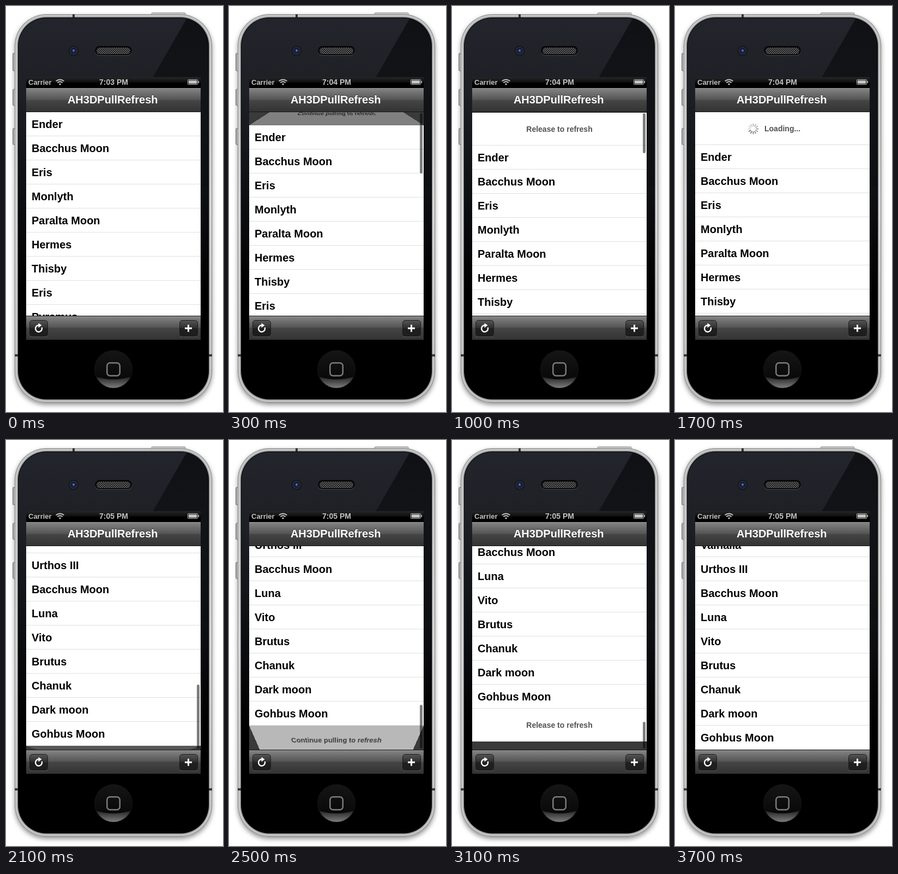
These frames come from a looping animation (398x742 px, 3.8 s). An HTML page:

```html
<!DOCTYPE html>
<html lang="en">
<head>
<meta charset="utf-8">
<title>Pull to refresh</title>
<style>
  html, body { margin: 0; width: 100%; height: 100%; overflow: hidden; background: #fff; }
  body, text { font-family: "Liberation Sans", Arial, sans-serif; font-weight: bold; }
  #phone { position: absolute; left: 0; top: 0; display: block; }
  #table { position: absolute; left: 37px; top: 194px; width: 320px; height: 372px; overflow: hidden; background: #3a3a3a; }
  #rows { position: absolute; left: 0; top: 0; width: 100%; }
  .row { box-sizing: border-box; height: 44px; padding-left: 10px; background: #fff; border-bottom: 1px solid #e0e0e0; font-size: 20px; line-height: 44px; white-space: nowrap; }
  #fold { position: absolute; left: 0; width: 320px; height: 60px; background: #fff; font-size: 14px; line-height: 61px; color: #525252; text-align: center; white-space: nowrap; }
  #fold.head { box-shadow: inset 0 -1px #e0e0e0; }
  #fold.busy #label { position: absolute; left: 127px; }
  #shade { position: absolute; inset: 0; background: #000; }
  #spin { position: absolute; left: 96px; top: 20px; display: none; }
  #fold.busy #spin { display: block; }
  #bar { position: absolute; left: 313px; width: 5px; border-radius: 3px; background: rgba(0, 0, 0, .5); }
</style>
</head>
<body>
<svg id="phone" width="398" height="742" viewBox="0 0 398 742">
  <defs>
    <linearGradient id="glass" x1="0" y1="0" x2="0" y2="1">
      <stop offset="0" stop-color="#23252c"/><stop offset=".2" stop-color="#1d1f25"/>
      <stop offset=".5" stop-color="#0c0d10"/><stop offset=".72" stop-color="#000"/>
    </linearGradient>
    <linearGradient id="gloss" x1="0" y1="0" x2="0" y2="1">
      <stop offset="0" stop-color="#08090c" stop-opacity=".72"/><stop offset="1" stop-color="#08090c" stop-opacity=".3"/>
    </linearGradient>
    <linearGradient id="steel" x1="0" y1="0" x2="0" y2="1">
      <stop offset="0" stop-color="#c4c5c6"/><stop offset=".5" stop-color="#dcdcdc"/><stop offset="1" stop-color="#c2c2c2"/>
    </linearGradient>
    <linearGradient id="key" x1="0" y1="0" x2="1" y2="0">
      <stop offset="0" stop-color="#888"/><stop offset=".5" stop-color="#eee"/><stop offset="1" stop-color="#aaa"/>
    </linearGradient>
    <linearGradient id="status" x1="0" y1="0" x2="0" y2="1">
      <stop offset="0" stop-color="#262626"/><stop offset=".5" stop-color="#0c0c0c"/><stop offset=".5" stop-color="#000"/>
    </linearGradient>
    <linearGradient id="chrome" x1="0" y1="0" x2="0" y2="1">
      <stop offset="0" stop-color="#858585"/><stop offset=".5" stop-color="#525252"/>
      <stop offset=".5" stop-color="#454545"/><stop offset="1" stop-color="#333"/>
    </linearGradient>
    <linearGradient id="button" x1="0" y1="0" x2="0" y2="1">
      <stop offset="0" stop-color="#555"/><stop offset=".5" stop-color="#2c2c2c"/>
      <stop offset=".5" stop-color="#202020"/><stop offset="1" stop-color="#1d1d1d"/>
    </linearGradient>
    <linearGradient id="home" x1="0" y1="0" x2="0" y2="1">
      <stop offset="0" stop-color="#151515"/><stop offset="1" stop-color="#050505"/>
    </linearGradient>
    <linearGradient id="shine" x1="0" y1="0" x2="0" y2="1">
      <stop offset="0" stop-color="#1c1c1c"/><stop offset="1" stop-color="#858585"/>
    </linearGradient>
    <radialGradient id="lens">
      <stop offset="0" stop-color="#3c5cb0"/><stop offset=".5" stop-color="#1c2c62"/><stop offset="1" stop-color="#0a0d1a"/>
    </radialGradient>
    <pattern id="mesh" width="4" height="4" patternUnits="userSpaceOnUse">
      <rect width="4" height="4" fill="#595959"/>
      <circle cx="1" cy="1" r="1.05" fill="#161616"/><circle cx="3" cy="3" r="1.05" fill="#161616"/>
    </pattern>
    <filter id="drop" x="-10%" y="-10%" width="120%" height="120%">
      <feDropShadow dx="0" dy="4" stdDeviation="4" flood-color="#000" flood-opacity=".42"/>
    </filter>
    <clipPath id="face"><rect x="23" y="22" width="348" height="696" rx="51"/></clipPath>
    <clipPath id="dish"><circle cx="197" cy="664" r="34"/></clipPath>
  </defs>

  <g fill="url(#key)" stroke="#8b8b8b">
    <rect x="12.5" y="86.500" width="6" height="32" rx="1.500"/>
    <rect x="12.500" y="152" width="6" height="30" rx="2"/>
    <rect x="12.500" y="223.500" width="6" height="30" rx="2"/>
    <rect x="267" y="12.500" width="62" height="6" rx="1.500" fill="#d8d8d8"/>
  </g>
  <rect x="16" y="15" width="362" height="710" rx="58" fill="#858585" filter="url(#drop)"/>
  <rect x="17" y="16" width="360" height="708" rx="57" fill="url(#steel)"/>
  <rect x="20.500" y="19.500" width="353" height="701" rx="53.500" fill="#929292"/>
  <path d="M16 638.500h7M371 638.500h7M124 15v7" stroke="#333" stroke-width="4"/>
  <rect x="22" y="21" width="350" height="698" rx="52" fill="#000"/>
  <rect x="23" y="22" width="348" height="696" rx="51" fill="url(#glass)"/>
  <path d="M333 20L258 150V330H372V20z" fill="url(#gloss)" clip-path="url(#face)"/>

  <circle cx="124" cy="82" r="9.500" fill="#15171c"/>
  <circle cx="124" cy="82" r="7.500" fill="#282b32"/>
  <circle cx="124" cy="82" r="5" fill="url(#lens)"/>
  <circle cx="124" cy="81" r="1.300" fill="#6c8be0"/>
  <rect x="163" y="74" width="68" height="17" rx="8.500" fill="#4b4d52"/>
  <rect x="163" y="73" width="68" height="17" rx="8.500" fill="#08080a"/>
  <rect x="166" y="76" width="62" height="12" rx="6" fill="url(#mesh)"/>

  <circle cx="197" cy="664" r="35" fill="#151515"/>
  <circle cx="197" cy="664" r="34" fill="url(#home)"/>
  <path d="M160 676Q197 689 234 676V700H160z" fill="url(#shine)" clip-path="url(#dish)"/>
  <rect x="185.300" y="652.300" width="23.500" height="23.500" rx="5.500" fill="none" stroke="#7c7c7c" stroke-width="2.500"/>

  <rect x="37" y="130" width="320" height="480" fill="#000"/>
  <rect x="37" y="130" width="320" height="20" fill="url(#status)"/>
  <g fill="#c2c2c2">
    <text x="41" y="144" font-size="13">Carrier</text>
    <text id="clock" x="197.500" y="144" font-size="14" text-anchor="middle">7:03 PM</text>
    <path d="M96.800 142.600Q99 140.600 101.200 142.600L99 145z"/>
    <path d="M94.300 140.200Q99 136.400 103.700 140.200M91.600 137.300Q99 131.700 106.400 137.300" fill="none" stroke="#c2c2c2" stroke-width="2"/>
    <rect x="333.500" y="134.500" width="18" height="9" rx="1" fill="none" stroke="#c2c2c2"/>
    <path d="M335 136h15v6h-15zM352.500 137h1.500v4h-1.500z"/>
  </g>

  <rect x="37" y="150" width="320" height="44" fill="url(#chrome)"/>
  <path d="M37 150.500H357" stroke="#9c9c9c"/>
  <path d="M37 193.500H357" stroke="#151515"/>
  <text x="195.700" y="177" font-size="20" fill="#000" fill-opacity=".5" text-anchor="middle">AH3DPullRefresh</text>
  <text x="195.700" y="178" font-size="20" fill="#fff" text-anchor="middle">AH3DPullRefresh</text>

  <rect x="37" y="567" width="320" height="43" fill="url(#chrome)"/>
  <path d="M37 566.500H357" stroke="#111"/>
  <path d="M37 567.500H357" stroke="#8e8e8e"/>
  <g fill="url(#button)" stroke="#1b1b1b">
    <rect x="43.500" y="574.500" width="33" height="29" rx="5"/>
    <rect x="318.500" y="574.500" width="33" height="29" rx="5"/>
  </g>
  <path d="M44 604.500h32M319 604.500h32" stroke="#626262" opacity=".7"/>
  <path d="M65.700 587.500A6 6 0 1 1 60 583.500" fill="none" stroke="#fff" stroke-width="2.400"/>
  <path d="M59.500 579.500L65.500 583.500L59.500 588z" fill="#fff"/>
  <path d="M328 589h13M334.500 582.500v13" stroke="#fff" stroke-width="3"/>
</svg>

<div id="table">
  <div id="fold">
    <svg id="spin" width="21" height="21" viewBox="-10.500 -10.500 21 21"></svg>
    <span id="label"></span>
    <div id="shade"></div>
  </div>
  <div id="rows"></div>
  <div id="bar"></div>
</div>

<script>
  const $ = id => document.getElementById(id);
  const LOOP = 3800, STEP = 100, VIEW = 372, ROW = 44, FOLD = 60, CUT = 2000;
  const first = ["Ender", "Bacchus Moon", "Eris", "Monlyth", "Paralta Moon", "Hermes", "Thisby", "Eris", "Pyramus"];
  const last = ["Valhalla", "Urthos III", "Bacchus Moon", "Luna", "Vito", "Brutus", "Chanuk", "Dark moon", "Gohbus Moon"];

  // [time, distance pulled past the end of the list]
  const headPull = [[0, 0], [100, 5], [300, 24], [600, 44], [1000, 61], [1200, 66], [1300, 60], [1800, 60], [1900, 22], [2000, 0]];
  const footPull = [[2000, 0], [2100, 7], [2300, 27], [2500, 44], [2800, 62], [3100, 75], [3200, 70], [3300, 60], [3500, 60], [3600, 22], [3700, 0]];

  function along(keys, t) {
    const i = keys.findIndex(k => k[0] >= t);
    if (i < 0) return keys[keys.length - 1][1];
    if (i === 0) return keys[0][1];
    const [t0, a] = keys[i - 1], [t1, b] = keys[i];
    return Math.round(a + (b - a) * (t - t0) / (t1 - t0));
  }

  const spokes = Array.from({ length: 12 }, (_, i) => {
    const line = document.createElementNS("http://www.w3.org/2000/svg", "path");
    line.setAttribute("d", "M0-5.500V-9");
    line.setAttribute("transform", `rotate(${i * 30})`);
    line.setAttribute("stroke", "#777");
    line.setAttribute("stroke-width", 2);
    line.setAttribute("stroke-linecap", "round");
    $("spin").append(line);
    return line;
  });

  let shown;
  function fill(names) {
    if (names === shown) return;
    shown = names;
    $("rows").replaceChildren(...names.map(name => {
      const row = document.createElement("div");
      row.className = "row";
      row.textContent = name;
      return row;
    }));
  }

  function setFold(pull, atFoot, busy) {
    const fold = $("fold"), shut = Math.max(0, 1 - pull / FOLD);
    const squash = 1 - .15 * shut;
    const depth = .0193 * shut ** 1.5 * (atFoot ? 1 : -1);
    fold.className = (atFoot ? "" : "head ") + (busy ? "busy" : "");
    fold.style.top = (atFoot ? VIEW - pull : pull - FOLD) + "px";
    fold.style.transformOrigin = atFoot ? "50% 0" : "50% 100%";
    fold.style.transform = shut ? `matrix3d(1,0,0,0, 0,${squash},0,${depth}, 0,0,1,0, 0,0,0,1)` : "none";
    fold.style.visibility = pull ? "visible" : "hidden";
    $("shade").style.opacity = .72 * shut ** .72;
    $("label").textContent = busy ? "Loading..." : shut ? "Continue pulling to refresh" : "Release to refresh";
  }

  function draw(t) {
    const atFoot = t >= CUT;
    const pull = along(atFoot ? footPull : headPull, t);
    const busy = atFoot ? t >= 3300 && t <= 3500 : t >= 1300 && t <= 1800;
    const closing = t >= 3600 || t === 1900;

    fill(atFoot ? last : first);
    $("rows").style.top = (atFoot ? VIEW - last.length * ROW - pull : pull) + "px";
    setFold(pull, atFoot, busy);

    const size = (atFoot ? 124 : 134) - pull;
    const bar = $("bar").style;
    bar.display = pull && !busy && !closing ? "block" : "none";
    bar.height = size + "px";
    bar.top = (atFoot ? VIEW - 2 - size : 2) + "px";

    const turn = Math.floor(t * 12 / 1000);
    spokes.forEach((s, i) => s.setAttribute("opacity", 1 - .065 * ((turn - i + 240) % 12)));
    $("clock").textContent = atFoot ? "7:05 PM" : t ? "7:04 PM" : "7:03 PM";
  }

  const start = performance.now();
  function tick() {
    const t = (performance.now() - start) % LOOP;
    draw(Math.floor(t / STEP) * STEP);
    requestAnimationFrame(tick);
  }
  tick();
</script>
</body>
</html>
```
